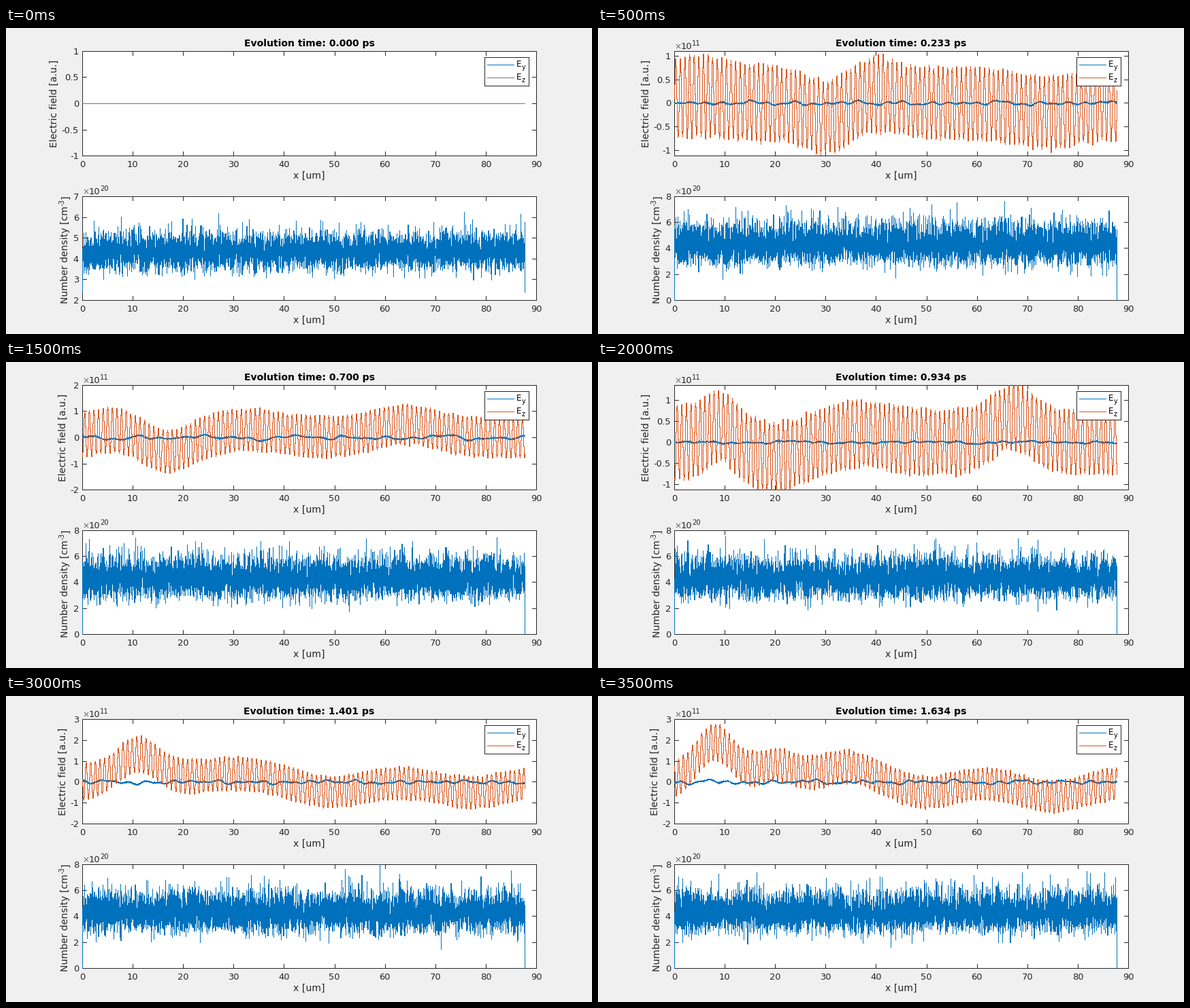
Write a matplotlib script that moves like this. It is 861 by 451 pixels and loops after 4 s.

```python
from itertools import count

import matplotlib.pyplot as plt
import numpy as np
from matplotlib.animation import FuncAnimation
from matplotlib.patches import Rectangle

W, H, DPI = 861, 451, 64
PT = 72 / DPI  # points per pixel
LEFT, RIGHT = 112, 779
TOP_PANEL, LOW_PANEL = (34, 188), (248, 401)
X_END = 87.75
STEP_PS = 0.23345
WAVE_PX = 6.77
BLUE, ORANGE, FLAT = "#0072bd", "#d95319", "#757575"
INK, BACK = "#262626", "#f0f0f0"

# Per step: field limits, then humps of the mean as (height, centre, width).
STEPS = [
    ((-1, 1), []),
    ((-1.12, 1.1), [(.15, 5, 5), (-.3, 30, 4), (.2, 40, 4), (-.2, 74, 6)]),
    ((-2, 1.19), [(-.65, 9.5, 4), (.4, 26, 7), (-.4, 49.5, 4), (.4, 65, 9)]),
    ((-2, 2), [(.3, 6, 4), (-.55, 17, 4), (.3, 33, 6), (.5, 64, 6)]),
    ((-1.13, 1.35), [(.42, 9, 2.5), (-.35, 20, 5), (.2, 37, 5), (.6, 67, 4)]),
    ((-3, 1.02), [(-1.75, 16.8, 5.5), (-.45, 52, 6), (.2, 67, 4), (-.5, 80, 5)]),
    ((-2, 3), [(1.3, 11, 4), (.4, 30, 8), (-.5, 49, 6), (-.5, 77, 6)]),
    ((-2, 3), [(1.9, 8, 3.6), (.8, 20, 4), (.75, 34, 5), (-.5, 50, 5),
               (-.7, 75, 6)]),
]

plt.rcParams["font.family"] = "DejaVu Sans"
plt.rcParams["path.simplify"] = False

fig = plt.figure(figsize=(W / DPI, H / DPI), dpi=DPI, facecolor=BACK)
ax = fig.add_axes([0, 0, 1, 1])
layer = count(1)


def to_px(x):
    return LEFT + x * (RIGHT - LEFT) / 90


def to_py(v, limits, panel):
    lo, hi = limits
    top, bottom = panel
    return bottom - (np.clip(v, lo, hi) - lo) * (bottom - top) / (hi - lo)


def line(xs, ys, color):
    """Crisp one-pixel line through whole pixels."""
    ax.plot(np.round(xs) + .5, np.round(ys) + .5, color=color, lw=.5 * PT,
            drawstyle="steps-post", antialiased=False, snap=False,
            solid_capstyle="projecting", solid_joinstyle="miter",
            zorder=next(layer))


def text(x, y, s, size=13, color=INK, **kw):
    ax.text(x, y, s, fontsize=size * PT, color=color, va="baseline",
            zorder=next(layer), **kw)


def side_text(x, y, s, size=14):
    text(x, y, s, size, rotation=90, rotation_mode="anchor")


def box(x0, y0, x1, y1):
    ax.add_patch(Rectangle((x0, y0), x1 - x0, y1 - y0, fc="white", ec="none",
                           zorder=next(layer)))
    line([x0, x1, x1, x0, x0], [y0, y0, y1, y1, y0], INK)


def panel_frame(panel, limits, step):
    top, bottom = panel
    box(LEFT, top, RIGHT, bottom)
    for v in range(0, 91, 10):
        x = to_px(v)
        line([x, x], [bottom, bottom - 6], INK)
        line([x, x], [top, top + 6], INK)
        text(x, bottom + 17, str(v), ha="center")
    first, last = np.ceil(limits[0] / step), np.floor(limits[1] / step)
    for v in np.arange(first, last + 1) * step:
        y = round(to_py(v, limits, panel))
        line([LEFT, LEFT + 6], [y, y], INK)
        line([RIGHT, RIGHT - 6], [y, y], INK)
        text(107, y + 5, f"{v:g}", ha="right")
    text(445.5, bottom + 34, "x [um]", 14, ha="center")


def power_label(top, exponent):
    text(112, top - 3, "×", 12, "#6a6a6a")
    text(121.5, top - 3, "10", 13)
    text(138, top - 8, exponent, 10)


def ripple(x, rng):
    """Slow random wander with a little grain, in pixels."""
    y = rng.normal(0, .5, x.size)
    for wave in (3, 4.5, 7, 10, 15, 24):
        y += rng.uniform(.4, 1.4) * np.sin(2 * np.pi * (x / wave + rng.random()))
    return y


def draw_field(k, rng, color):
    limits, humps = STEPS[k]
    step = .5 if limits[1] - limits[0] < 2.6 else 1
    panel_frame(TOP_PANEL, limits, step)
    side_text(75 if step < 1 else 87.5, 175.5, "Electric field [a.u.]")
    started = min(k, 1)
    if started:
        power_label(TOP_PANEL[0], "11")

    x = np.linspace(0, X_END, 6500)
    px = to_px(x)
    zero = to_py(0, limits, TOP_PANEL)
    line(px, zero + started * ripple(x, rng), BLUE)

    mean = sum(h * np.exp(-.5 * ((x - c) / w) ** 2) for h, c, w in humps)
    swing = .76 + .12 * np.exp(-x / 30)
    swing += np.interp(x, np.arange(0, 90, .9), rng.normal(0, .035, 100))
    crest = LEFT + 1 + .7 * k
    wave = np.cos(2 * np.pi * (px - crest) / WAVE_PX)
    ez = mean + started * swing * wave
    line(px, to_py(ez, limits, TOP_PANEL), color)


def draw_density(k, rng):
    limits, step, sigma, edge = ((0, 8), 2, .82, 0) if k else ((2, 7), 1, .45, 2.4)
    panel_frame(LOW_PANEL, limits, step)
    power_label(LOW_PANEL[0], "20")
    side_text(91.5, 405.5, "Number density [cm")
    side_text(86, 262, "-3", 10)
    side_text(91.5, 251.5, "]")
    # Nearly normal noise, leaning slightly upward.
    skew = 90
    noise = (rng.gamma(skew, size=6500) - skew) / np.sqrt(skew)
    density = 4.35 + sigma * noise
    density[[0, -1]] = edge
    px = to_px(np.linspace(0, X_END, density.size))
    line(px, to_py(density, limits, LOW_PANEL), BLUE)


def draw_legend(z_color):
    box(703, 43, 768, 85)
    for name, y, color in (("y", 54, BLUE), ("z", 73, z_color)):
        line([707, 746], [y, y], color)
        text(749.5, y + 3, "E", 12, "black")
        text(757.5, y + 7, name, 9.5, "black")


def draw(k):
    ax.clear()
    ax.set(xlim=(0, W), ylim=(H, 0))
    ax.axis("off")
    rng = np.random.default_rng(40 + k)
    z_color = ORANGE if k else FLAT
    draw_field(k, rng, z_color)
    draw_density(k, rng)
    draw_legend(z_color)
    text(445.5, 27, f"Evolution time: {k * STEP_PS:.3f} ps", 14, "black",
         weight="bold", ha="center")


anim = FuncAnimation(fig, draw, frames=len(STEPS), interval=500,
                     init_func=lambda: [], repeat=True, repeat_delay=0)
plt.show()
```
